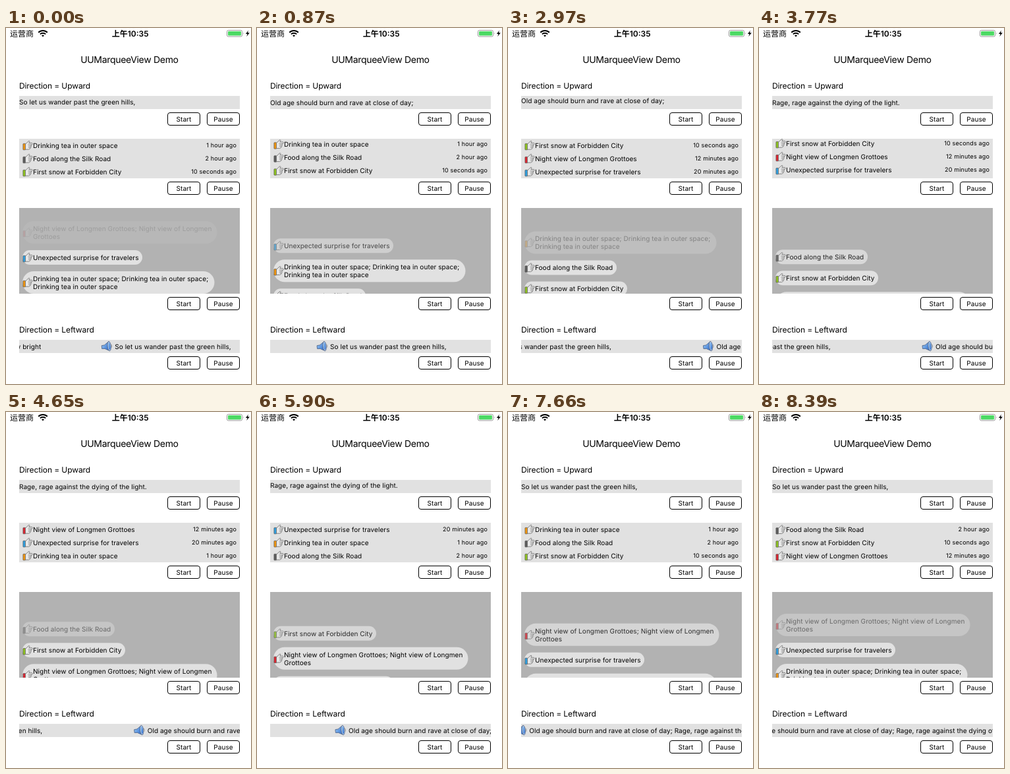
An HTML page that plays this animation: 372x540 px, repeating every 8.49 s.

```html
<!DOCTYPE html>
<html lang="en">
<head>
<meta charset="utf-8">
<title>UUMarqueeView Demo</title>
<style>
html, body { margin: 0; width: 100%; height: 100%; overflow: hidden; background: #fff; }
#stage { display: block; }
text { font: 10px Inter, "Noto Sans", sans-serif; letter-spacing: .06px; text-rendering: geometricPrecision; white-space: pre; }
.title { font-size: 14px; letter-spacing: -.31px; text-anchor: middle; }
.head { font-size: 12px; letter-spacing: -.1px; }
.mid { text-anchor: middle; }
.end { text-anchor: end; }
.time { font-size: 9px; letter-spacing: .16px; text-anchor: end; }
.bar { font: 12px Inter, "Noto Sans CJK SC", "Noto Sans CJK", sans-serif; letter-spacing: 0; }
.bold { font-weight: 600; text-anchor: middle; }
</style>
</head>
<body>
<svg id="stage" width="372" height="540">
  <defs>
    <linearGradient id="horn" x2="1" y2="1">
      <stop offset="0" stop-color="#9fd0fa"/><stop offset="1" stop-color="#2460c4"/>
    </linearGradient>
    <g id="hand" stroke-linejoin="round">
      <path d="M4.5 6.2 9 1.8Q10.6.7 11 2.2L9.8 4.5H14.6Q16.2 5.6 14.6 6.9H13Q14 8 12.9 9.1 13.6 10.3 12.3 11.3 12.4 12.7 11 13.4L9.6 14.2H4.5Z" fill="#e8e8e8" stroke="#777" stroke-width=".9"/>
      <path d="M8.6 6.9H13M9 9.1H12.9M9 11.3H12.3" fill="none" stroke="#777" stroke-width=".8"/>
    </g>
    <g id="speaker" stroke="#4c6286" stroke-width=".8" transform="rotate(-6 8 8)">
      <path d="M.6 6 5 5.6 12 .9V15.1L5 11.2.6 10.8Z" fill="url(#horn)"/>
      <ellipse cx="12" cy="8" rx="2.6" ry="7.2" fill="#c4d6ea"/>
      <ellipse cx="12.2" cy="8" rx="1.7" ry="5.8" fill="url(#horn)" stroke="none"/>
      <path d="M15.2 5.5Q16.8 8 15.2 10.5" fill="none" stroke="#888"/>
    </g>
  </defs>
  <text class="bar" x="6" y="12.5">运营商</text>
  <g fill="none" stroke="#000" stroke-width="2">
    <path d="M49.2 6.8A9.6 9.6 0 0 1 62.8 6.8M51.8 9.4A6 6 0 0 1 60.2 9.4"/>
    <path d="M54 11.2Q56 9.6 58 11.2L56 13.4Z" fill="#000" stroke="none"/>
  </g>
  <text class="bar bold" x="188.7" y="12.5">上午10:35</text>
  <rect x="335.5" y="3.5" width="23" height="9.5" rx="2" fill="none" stroke="#999"/>
  <rect x="337" y="5" width="20" height="6.5" rx="1" fill="#4cd964"/>
  <path d="M360 6.5q1.6 1.7 0 3.5z" fill="#999"/>
  <path d="M368 3.5 364 9h2.6L365.3 13 369.8 7.2H367Z"/>
  <text class="title" x="187.4" y="53">UUMarqueeView Demo</text>
  <text class="head" x="20" y="92.4">Direction = Upward</text>
  <text class="head" x="20" y="462.4">Direction = Leftward</text>
</svg>
<script>
const LOOP = 8490;
const FIRST_LINE = "So let us wander past the green hills,";
const OLD_LINE = "Old age should burn and rave at close of day;";
const RAGE_LINE = "Rage, rage against the dying of the light.";
const POSTS = [
  { text: "Drinking tea in outer space", time: "1 hour ago", color: "#f0950f", width: 291.5,
    lines: ["Drinking tea in outer space; Drinking tea in outer space;", "Drinking tea in outer space"] },
  { text: "Food along the Silk Road", time: "2 hour ago", color: "#5c5c5c", width: 140 },
  { text: "First snow at Forbidden City", time: "10 seconds ago", color: "#8ec31f", width: 156 },
  { text: "Night view of Longmen Grottoes", time: "12 minutes ago", color: "#dc2430", width: 295.5,
    lines: ["Night view of Longmen Grottoes; Night view of Longmen", "Grottoes"] },
  { text: "Unexpected surprise for travelers", time: "20 minutes ago", color: "#2f9fe0", width: 182 }
];

const stage = document.getElementById("stage");
const label = (x, mid, str, cls = "") =>
  `<text class="${cls}" x="${x}" y="${mid + (cls === "time" ? 3 : 4)}">${str}</text>`;
const add = html => stage.insertAdjacentHTML("beforeend", html);

// Nested svg clips its content; the viewBox keeps stage coordinates.
function panel(id, y, h, color, content) {
  add(`<svg x="20" y="${y}" width="335" height="${h}" viewBox="20 ${y} 335 ${h}">
    <rect x="20" y="${y}" width="335" height="${h}" fill="${color}"/><g id="${id}">${content}</g></svg>`);
  return document.getElementById(id);
}

function button(x, y, str) {
  add(`<rect x="${x + .5}" y="${y + .5}" width="49" height="19" rx="3.5" fill="none" stroke="#000"/>`
    + label(x + 25, y + 10, str, "mid"));
}

const icon = (color, mid) => `<g transform="translate(25 ${mid - 8})">
  <rect x=".9" y="5.4" width="3.8" height="9.4" rx=".6" fill="${color}" stroke="#555" stroke-width=".7"/>
  <use href="#hand"/></g>`;

function row(i) {
  const p = POSTS[i % 5], mid = 178 + 20 * i;
  return icon(p.color, mid) + label(41, mid, p.text) + label(350, mid, p.time, "time");
}

// Bubble centred on y = 0.
function bubble(p) {
  const lines = p.lines || [p.text], h = 10 + 12 * lines.length;
  return `<g><rect x="25" y="${-h / 2}" width="${p.width}" height="${h}" rx="${h / 2}" fill="#e1e1e1"/>`
    + icon(p.color, 0)
    + lines.map((s, i) => label(41, 12 * i - 6 * (lines.length - 1), s)).join("") + "</g>";
}

const GREY = "#e1e1e1";
const verse = panel("verse", 103, 20, GREY,
  [FIRST_LINE, OLD_LINE, RAGE_LINE, FIRST_LINE].map((s, i) => label(20, 113 + 20 * i, s)).join(""));
const list = panel("list", 168, 60, GREY, [...Array(9).keys()].map(row).join(""));

const queue = [3, 4, 0, 1, 2, 3, 4, 0].map(i => POSTS[i]);
const chat = panel("chat", 273, 130, "#b2b2b2", queue.map(bubble).join(""));
const heights = queue.map(p => p.lines ? 44 : 32);
let bottom = -heights[0] - heights[1] - heights[2];
const bottoms = heights.map(h => bottom += h);

const speaker = x => `<use href="#speaker" x="${x - 20.5}" y="475"/>`;
const ticker = panel("ticker", 473, 20, GREY,
  label(-112, 483, "crying how bright", "end")
  + speaker(0) + label(0, 483, FIRST_LINE)
  + speaker(336) + label(336, 483, OLD_LINE + " " + RAGE_LINE));

for (const y of [128, 233, 408, 498]) {
  button(245, y, "Start");
  button(305, y, "Pause");
}

const clamp = v => Math.min(1, Math.max(0, v));
const ease = v => (1 - Math.cos(Math.PI * clamp(v))) / 2;
const steps = (t, starts, length) => starts.reduce((sum, s) => sum + ease((t - s) / length), 0);
const move = (el, x, y) => el.setAttribute("transform", `translate(${x} ${y})`);
const listStarts = [...Array(6).keys()].map(k => 784 + 1434 * k);

function draw(t) {
  const sec = t / 1000;
  move(verse, 0, -20 * steps(t, [-155, 2700, 5680], 1000));
  move(list, 0, -20 * steps(t, listStarts, 475));

  // The top bubble fades while the one two places below slides in.
  const scroll = 20.38 * sec - 5;
  [...chat.children].forEach((el, i) => {
    move(el, 0, 403 + bottoms[i] - heights[i] / 2 - scroll);
    const next = i + 2;
    el.setAttribute("opacity", next < queue.length ? clamp((bottoms[next] - scroll) / heights[next]) : 1);
  });

  move(ticker, 165.3 - 62.2 * sec + 1.6 * Math.max(0, sec - 2.97), 0);
}

function tick() {
  draw(performance.now() % LOOP);
  requestAnimationFrame(tick);
}
tick();
</script>
</body>
</html>
```
